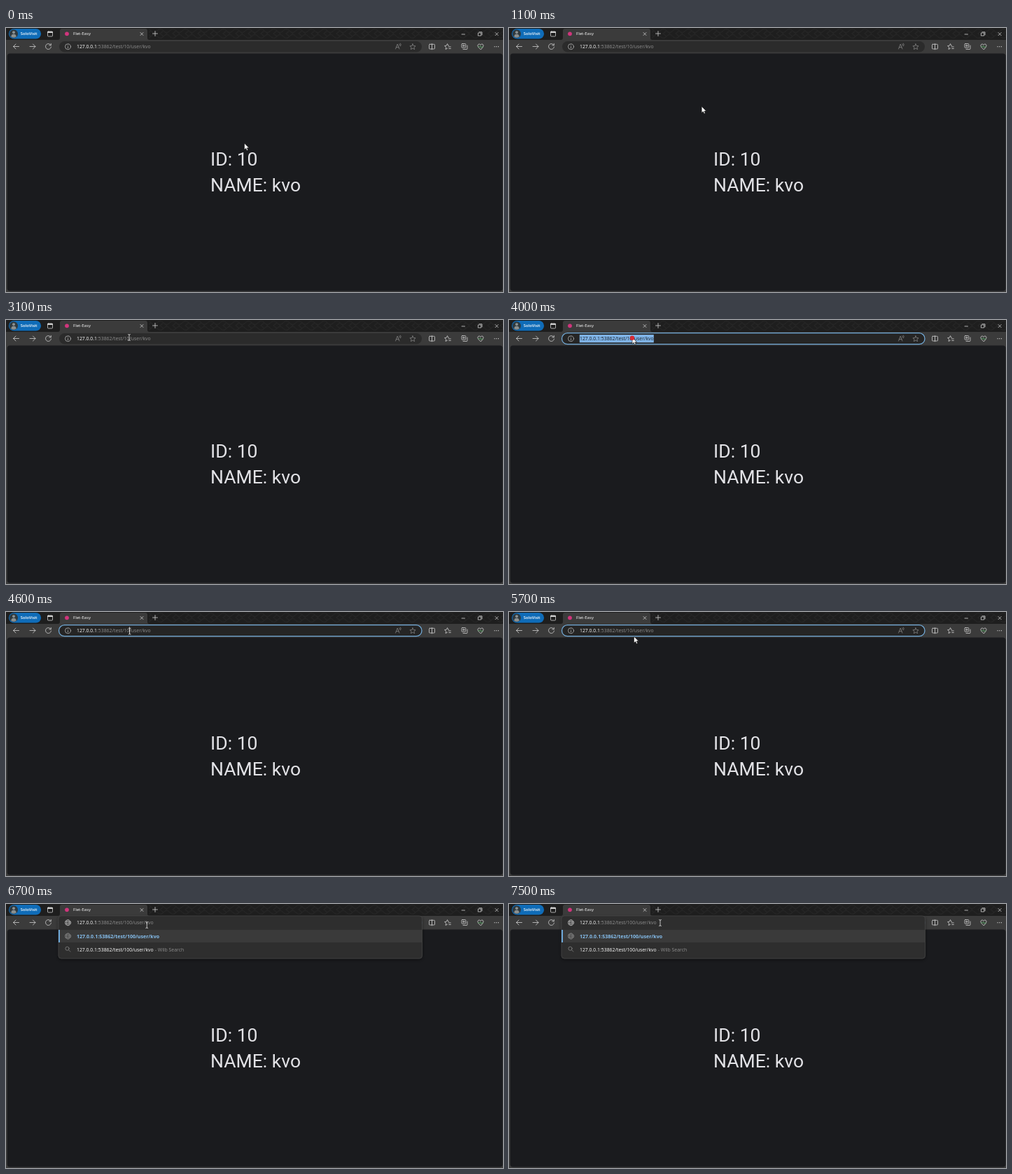
An HTML page that plays this animation: 710 by 378 pixels, repeating every 8 s.

```html
<!DOCTYPE html>
<html lang="en">
<head>
<meta charset="utf-8">
<title>Browser address bar</title>
<style>
  html, body { margin: 0; width: 100%; height: 100%; overflow: hidden; background: #1a1b1e; }
  svg { display: block; width: 100%; height: 100%; }
  text { font-family: "Open Sans", "Noto Sans", sans-serif; font-size: 6.86px; font-weight: 500; fill: #fff; white-space: pre; }
  .page text { font-family: Roboto, sans-serif; font-size: 26.55px; font-weight: 400; fill: #e2e2e6; }
  .dim { fill: #8f8f8f; }
  .icon { fill: none; stroke: #d0d0d0; stroke-width: .8; stroke-linecap: round; stroke-linejoin: round; }
  .soft { stroke: #8e8e8e; stroke-width: .7; }
  .lit { stroke: #c8c8c8; }
</style>
</head>
<body>
<svg viewBox="0 0 710 378">
  <defs>
    <pattern id="weave" width="18" height="16" patternUnits="userSpaceOnUse">
      <path d="M0 4q4.500-5 9 0t9 0M0 12q4.500 5 9 0t9 0M4 8l5-4 5 4-5 4z" fill="none" stroke="#252525" stroke-width="1.200"/>
    </pattern>
    <filter id="shade" x="-5%" y="-20%" width="110%" height="150%">
      <feDropShadow dx="0" dy="2" stdDeviation="2.500" flood-color="#000" flood-opacity=".4"/>
    </filter>
    <g id="globe" class="icon lit" style="stroke-width:.7">
      <circle r="4"/><ellipse rx="1.800" ry="4"/><path d="M-3.700-1.300h7.400M-3.700 1.300h7.400"/>
    </g>
    <path id="star" d="M0-4l1.200 2.700 2.900.3-2.200 1.900.7 2.900L0 2.300l-2.600 1.500.7-2.900-2.200-1.900 2.900-.3z"/>
  </defs>

  <rect width="710" height="378" fill="#3b3b3b"/>
  <rect width="710" height="17" fill="#1e1e1e"/>
  <rect x="204" width="506" height="17" fill="url(#weave)"/>
  <path d="M74 17q3 0 3-3V4q0-3 3-3h119q3 0 3 3v10q0 3 3 3z" fill="#3b3b3b"/>

  <!-- title strip -->
  <rect x="4" y="1" width="46" height="14.500" rx="7.200" fill="#0f6cb8"/>
  <circle cx="11" cy="8.200" r="6" fill="#2f3a40"/>
  <circle cx="11" cy="6.300" r="2" fill="#8b9090"/>
  <path d="M7.300 12.600q0-3.800 3.700-3.800t3.700 3.800q-3.700 2.400-7.400 0z" fill="#8b9090"/>
  <text x="20.800" y="10.300" style="font-size:5.800px;font-weight:600">SoloVisit</text>
  <circle cx="87" cy="8.300" r="2.900" fill="#d0357c"/>
  <text x="96" y="10.400" style="font-size:6.100px">Flet-Easy</text>
  <g class="icon">
    <rect x="59.500" y="5" width="7" height="7" rx="1"/><path d="M59.800 6h6.400" stroke-width="1.800"/>
    <path d="M192 6.500l4 4m0-4l-4 4M213 4.500v7m-3.500-3.500h7"/>
    <path d="M651 9h4.500M674.800 7h4v4h-4zM676 5.800h4v4M699 6.500l4.200 4.200m0-4.200l-4.200 4.200"/>
  </g>

  <!-- toolbar -->
  <g class="icon">
    <path d="M18.500 26.500h-8m3.500-3.500l-3.500 3.500 3.500 3.500M34 26.500h8m-3.500-3.500l3.500 3.500-3.500 3.500"/>
    <path d="M64 24.500a4 4 0 1 0 .5 2.500M64.300 22.300v2.500h-2.500"/>
    <rect x="604.500" y="23.300" width="8" height="6.700" rx="1"/><path d="M608.500 22.500v8.300"/>
    <path d="M632.500 25.300l-.8-.1-1.200-2.600-1.200 2.600-2.700.4 2 2-.6 2.900 2.500-1.400M632.300 27h3M632.800 29.500h2.500"/>
    <rect x="651" y="22.500" width="5.800" height="5.800" rx="1"/><path d="M653 30.500h5q1 0 1-1v-4.500M653.900 24v2.800m-1.400-1.400h2.800"/>
    <path d="M678 30.700l-3.300-3.300q-2-2.800.3-4.200 1.700-.7 3 1 1.300-1.700 3-1 2.300 1.400.3 4.200z"/>
    <path d="M674.500 27h2l1-1.700 1.300 3 .9-1.300h1.500" stroke="#5aa866"/>
    <path d="M698 26.700h.1m2.600 0h.1m2.600 0h.1" stroke-width="1.200"/>
  </g>

  <g class="page">
    <rect x="1.700" y="36.500" width="707.800" height="340" rx="4" fill="#1a1b1e"/>
    <text x="292" y="196.500">ID: 10</text>
    <text x="292" y="234">NAME: kvo</text>
  </g>

  <!-- address field -->
  <rect id="field" x="76" y="19" width="518" height="15.500" rx="7.700" fill="#2b2b2b"/>
  <rect id="ring" x="75.500" y="18.700" width="518.500" height="16" rx="8" fill="#252525" stroke="#71a9d6" stroke-width="1.300"/>
  <g id="tools" class="icon soft">
    <path d="M556.500 30l2.700-7 2.700 7m-4.500-2.300h3.600M562 22.800q1.100 1 0 2.300M563.500 22q1.700 1.800 0 3.900"/>
    <use href="#star" x="581" y="26.800"/>
    <g class="lit"><circle cx="88.500" cy="26.700" r="4"/><path d="M88.500 26.500v2.300m0-4.400v.1"/></g>
  </g>

  <g id="list">
    <rect x="75" y="17" width="519.500" height="61" rx="4" fill="#2d2d2d" stroke="#4a4a4a" stroke-width=".7" filter="url(#shade)"/>
    <rect x="75.400" y="37" width="518.700" height="18" fill="#3a3a3a"/>
    <rect x="75" y="37" width="2" height="18" fill="#6ea9da"/>
    <use href="#globe" x="88.500" y="26.700"/>
    <use href="#globe" x="88.500" y="46" opacity=".6"/>
    <g class="icon soft"><circle cx="87.500" cy="63.800" r="2.600"/><path d="M89.500 65.800l2.400 2.400"/></g>
    <text x="101" y="48.600" style="font-size:7.050px;font-weight:700;fill:#86bfee">127.0.0.1:53862/test/100/user/kvo</text>
    <text x="101" y="67.500">127.0.0.1:53862/test/100/user/kvo<tspan class="dim" x="212.800">- Wilb Search</tspan></text>
  </g>

  <rect id="mark" x="100.800" y="21" width="106" height="11.300" fill="#7fb3e6"/>
  <text id="url" x="101" y="29.100"><tspan>127.0.0.1</tspan><tspan id="path" class="dim"></tspan></text>
  <rect id="caret" y="21.300" width=".8" height="10" fill="#d8d8d8"/>

  <g id="pointer">
    <path id="arrow" d="M0 0v9.300l2.200-2 1.400 3.200 1.600-.7-1.400-3.100h2.900z" fill="#fff" stroke="#111" stroke-width=".6"/>
    <path id="beam" d="M-1.800-4.500q1.800 0 1.800 1 0-1 1.800-1M0-4v8M-1.800 4.500q1.800 0 1.800-1 0 1 1.800 1" fill="none" stroke="#e0e0e0" stroke-width=".8"/>
    <circle id="press" cy=".8" r="3.200" fill="#d92b35"/>
  </g>
</svg>
<script>
const LOOP = 8000, STEP = 100;
const FOCUS = 3200, SELECT = 3400, PLACE = 4200, TYPE = 5900, END = 7000;
const presses = [[3200, 3400], [4000, 4200], [7000, 7200]];

// Pointer stops: time, x, y
const stops = [
  [800, 340.5, 165], [1500, 174.5, 31], [1700, 181.5, 25.5], [2000, 181.5, 25.5],
  [2100, 181.5, 26], [2200, 181.5, 26], [2600, 176, 25], [4500, 176, 25],
  [4800, 178.5, 35], [6300, 178.5, 35], [7000, 216, 27]
];

const $ = id => document.getElementById(id);
const show = (id, on) => $(id).style.display = on ? "" : "none";
const within = (t, from, to) => t >= from && t < to;
const ease = p => p * p * (3 - 2 * p);

function pointerAt(t) {
  const i = stops.findIndex(s => s[0] > t);
  if (i === 0) return stops[0].slice(1);
  if (i < 0) return stops[stops.length - 1].slice(1);
  const [t0, x0, y0] = stops[i - 1], [t1, x1, y1] = stops[i];
  const p = ease((t - t0) / (t1 - t0));
  return [x0 + (x1 - x0) * p, y0 + (y1 - y0) * p];
}

function draw(t) {
  const selected = within(t, SELECT, PLACE), typed = t >= TYPE;
  show("ring", t >= FOCUS);
  show("mark", selected);
  show("list", typed);
  show("tools", !typed);
  $("path").textContent = `:53862/test/${typed ? 100 : 10}/user/kvo`;
  $("url").style.fill = $("path").style.fill = selected ? "#17202b" : "";

  const since = [END, TYPE, PLACE].find(s => t >= s);
  show("caret", since && Math.floor((t - since) / 500) % 2 === 0);
  $("caret").setAttribute("x", t >= END ? 210.3 : typed ? 180.4 : 176);

  const [x, y] = pointerAt(t);
  const overText = y > 19 && y < 34 && !selected;
  $("pointer").setAttribute("transform", `translate(${x} ${y})`);
  show("beam", overText);
  show("arrow", !overText);
  show("press", presses.some(([from, to]) => within(t, from, to)));
}

const start = performance.now();
function tick() {
  const t = (performance.now() - start) % LOOP;
  draw(Math.floor(t / STEP) * STEP);
  requestAnimationFrame(tick);
}
tick();
</script>
</body>
</html>
```
